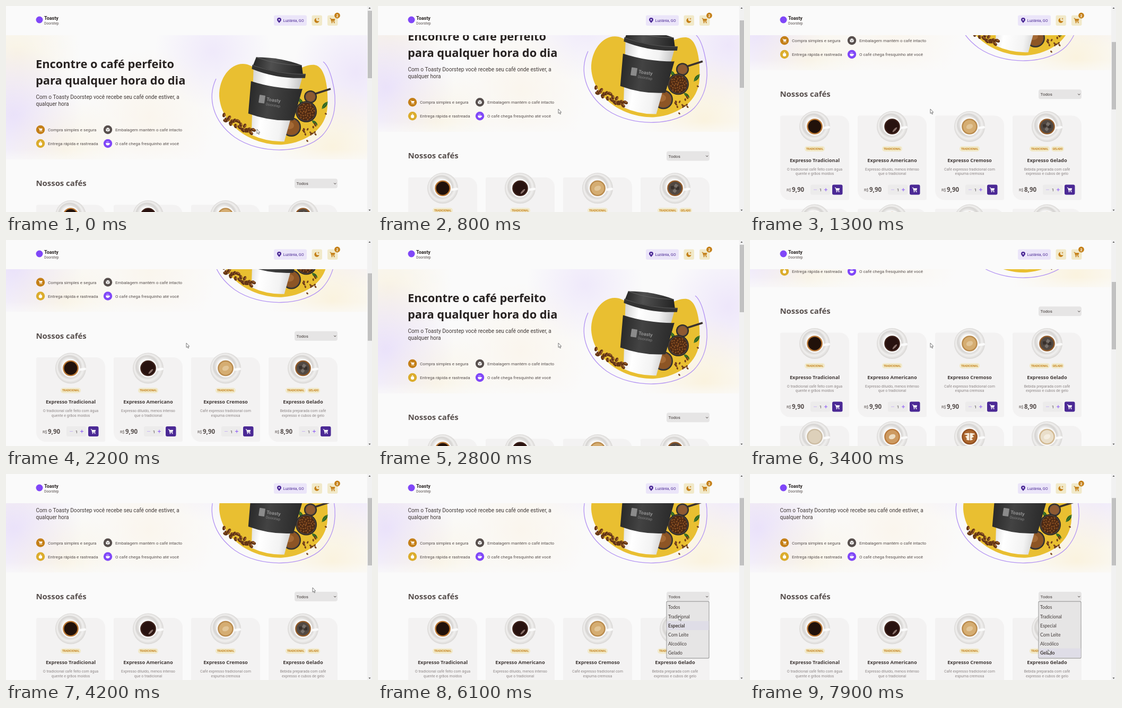
These frames come from a looping animation (690 px wide and 388 px high, 8 s). An HTML page with a canvas:

```html
<!DOCTYPE html>
<html lang="pt-BR">
<head>
<meta charset="utf-8">
<title>Cafeteria</title>
<style>
html, body { margin: 0; width: 100%; height: 100%; overflow: hidden; background: #fafafa; }
canvas { display: block; width: 690px; height: 388px; }
</style>
</head>
<body>
<canvas id="stage" width="690" height="388"></canvas>
<script>
const ctx = document.getElementById('stage').getContext('2d');
const LOOP = 8000, STEP = 100;
const SANS = 'Roboto, sans-serif', ROUND = '"Open Sans", sans-serif', HAND = 'Lato, cursive';
const INK = '#272221', DARK = '#403937', TEXT = '#574f4d', LABEL = '#8d8686';
const PURPLE = '#8047f8', DEEP = '#4b2995', LILAC = '#ebe5f9';
const AMBER = '#c47f17', GOLD = '#dbac2c', CREAM = '#f1e9c9';

// Keyframes: [time, value, ...]
const SCROLL = [[0, 0], [600, 0], [1000, 103.5], [1100, 103.5], [1300, 168], [1500, 207],
  [2000, 207], [2400, 100], [2700, 14], [2800, 0], [2900, 0], [3100, 75], [3300, 175],
  [3400, 200], [3500, 207], [3600, 207], [3900, 125], [4100, 103.5]];
const POINTER = [[0, 473, 232], [600, 340, 194], [3700, 340, 194], [4200, 578, 214],
  [4400, 578, 231], [5100, 578, 231], [5600, 573, 314], [6100, 567, 267], [6500, 565, 318],
  [6900, 562, 267], [7000, 562, 269], [7300, 562, 269], [7700, 562, 331]];
const OPEN_AT = 4700;

function at(keys, t) {
  const i = keys.findIndex(k => k[0] > t);
  if (i < 0) return keys[keys.length - 1].slice(1);
  const a = keys[i - 1], b = keys[i], p = (t - a[0]) / (b[0] - a[0]);
  return a.slice(1).map((v, j) => v + (b[j + 1] - v) * p);
}

function text(s, x, y, size, color, { font = SANS, weight = 400, align = 'left' } = {}) {
  ctx.font = `${weight} ${size}px ${font}`;
  ctx.textAlign = align;
  ctx.fillStyle = color;
  ctx.fillText(s, x, y);
}

function box(x, y, w, h, r, color) {
  ctx.fillStyle = color;
  ctx.beginPath();
  ctx.roundRect(x, y, w, h, r);
  ctx.fill();
}

function disc(x, y, r, color, ry = r, angle = 0) {
  ctx.fillStyle = color;
  ctx.beginPath();
  ctx.ellipse(x, y, r, ry, angle, 0, Math.PI * 2);
  ctx.fill();
}

function shape(d, fill, stroke, width = 1) {
  const p = new Path2D(d);
  if (fill) { ctx.fillStyle = fill; ctx.fill(p); }
  if (stroke) { ctx.strokeStyle = stroke; ctx.lineWidth = width; ctx.stroke(p); }
}

function place(x, y, scale, draw, angle = 0) {
  ctx.save();
  ctx.translate(x, y);
  ctx.rotate(angle);
  ctx.scale(scale, scale);
  draw();
  ctx.restore();
}

function glow(x, y, r, rgb, alpha) {
  const g = ctx.createRadialGradient(x, y, 0, x, y, r);
  g.addColorStop(0, `rgba(${rgb},${alpha})`);
  g.addColorStop(1, `rgba(${rgb},0)`);
  ctx.fillStyle = g;
  ctx.fillRect(0, 55, 681, 234);
}

function cart(x, y, scale, color) {
  place(x, y, scale, () => {
    shape('M-5 -4H-3.2L-1.6 2.2H4', null, color, 1.1);
    shape('M-3 -3H5L3.8 1H-2Z', color);
    disc(-1, 4, 1.1, color);
    disc(3.3, 4, 1.1, color);
  });
}

function random(seed) {
  return () => (seed = seed * 16807 % 2147483647) / 2147483647;
}

function bean(x, y, angle, size) {
  place(x, y, size, () => {
    disc(0, 0, 4.2, '#6b3a18', 2.9);
    disc(-0.4, -0.7, 3, '#a0622e', 1.6);
    shape('M-3.8 0Q0 1.4 3.8 0', null, '#35190a', 0.8);
  }, angle);
}

function bowl(x, y, r, filling) {
  disc(x, y, r, '#2b2523');
  disc(x, y, r - 1.5, '#4d4540');
  disc(x, y, r - 3, filling);
}

function leaf(x, y, angle, size) {
  place(x, y, size, () => {
    shape('M-9 0Q0 -7 9 0Q0 7 -9 0Z', '#2f6322');
    shape('M-9 0H9', null, '#6fa03c', 0.7);
  }, angle);
}

function paperCup() {
  place(514, 118, 1, () => {
    const paper = ctx.createLinearGradient(-48, 0, 48, 0);
    paper.addColorStop(0, '#d2d2d2');
    paper.addColorStop(0.3, '#ffffff');
    paper.addColorStop(0.7, '#f3f3f3');
    paper.addColorStop(1, '#c4c4c4');
    shape('M-47 6L-32 131Q0 140 31 134L47 6Z', paper);
    const sleeve = ctx.createLinearGradient(-48, 0, 48, 0);
    sleeve.addColorStop(0, '#292929');
    sleeve.addColorStop(0.4, '#434343');
    sleeve.addColorStop(1, '#2b2b2b');
    shape('M-48 31Q0 39 50 31L42 92Q0 101 -44 92Z', sleeve);
    const lid = ctx.createLinearGradient(-50, 0, 50, 0);
    lid.addColorStop(0, '#262626');
    lid.addColorStop(0.35, '#505050');
    lid.addColorStop(1, '#202020');
    shape('M-45 -15Q0 -22 42 -13L47 4Q0 12 -49 2Z', lid);
    shape('M-50 0Q0 10 52 2L52 10Q0 20 -50 8Z', '#333');
    shape('M-45 -15Q0 -6 42 -13', null, '#5e5e5e', 1);
    shape('M-50 1Q0 11 52 3', null, '#606060', 0.8);
    box(-28, 54, 11, 15, 1, '#8b8b8b');
    text('Toasty', -14, 63, 9, '#8f8f8f', { weight: 700 });
    text('Doorstep', -14, 72, 6.8, '#858585');
  }, 0.15);
}

function illustration() {
  shape('M402 170C401 135 424 108 447 109C466 109 476 128 510 130C542 130 559 109 582 111' +
    'C603 114 608 158 606 190C604 230 568 257 522 261C470 264 406 229 402 170Z', '#e9bf31');
  shape('M396 137C379 173 390 217 431 247C480 281 562 278 596 244C622 216 625 178 615 140' +
    'C611 124 606 111 598 105', null, '#b393f3', 1.3);
  const rnd = random(41);
  leaf(553, 194, -1.1, 1.2);
  leaf(556, 180, -2.1, 0.9);
  leaf(601, 187, -0.9, 1);
  leaf(582, 220, 0.7, 0.8);
  shape('M584 165L612 156', null, '#3b322e', 3.5);
  bowl(574, 171, 12, '#8e5a32');
  bowl(566, 199, 20, '#4a2814');
  for (let i = 0; i < 36; i++) {
    const a = i * 2.4, r = 2.6 * Math.sqrt(i);
    bean(566 + r * Math.cos(a), 199 + r * Math.sin(a), rnd() * 3, 0.55);
  }
  bowl(538, 228, 18, '#8d5525');
  disc(534, 225, 9, '#a56a35', 7);
  for (let i = 0; i < 14; i++) bean(560 + rnd() * 24, 222 + rnd() * 22, rnd() * 3, 0.55);
  bean(568, 254, 0.8, 0.5);
  bean(603, 203, 0.4, 0.5);
  paperCup();
  for (let i = 0; i < 24; i++) {
    const p = i / 23;
    bean(411 + p * 56, 209 + p * 30 + (rnd() - 0.5) * 13, rnd() * 3, 1);
  }
}

function feature(x, y, color, label, icon) {
  disc(x, y, 8.2, color);
  icon(x, y);
  text(label, x + 14, y + 3, 8.1, TEXT);
}

function hero() {
  glow(20, 90, 120, '248,238,212', 0.55);
  glow(15, 205, 130, '229,218,250', 0.75);
  glow(110, 275, 110, '249,238,208', 0.45);
  glow(390, 85, 110, '232,222,250', 0.6);
  glow(270, 210, 130, '250,240,222', 0.45);
  glow(660, 125, 120, '231,220,250', 0.65);
  glow(615, 265, 120, '250,238,205', 0.6);
  const fade = ctx.createLinearGradient(0, 270, 0, 290);
  fade.addColorStop(0, 'rgba(250,250,250,0)');
  fade.addColorStop(1, 'rgba(250,250,250,.6)');
  ctx.fillStyle = fade;
  ctx.fillRect(0, 270, 681, 20);

  const title = { font: ROUND, weight: 700 };
  text('Encontre o café perfeito', 56, 117, 21.8, INK, title);
  text('para qualquer hora do dia', 56, 148, 21.8, INK, title);
  text('Com o Toasty Doorstep você recebe seu café onde estiver, a', 56.5, 175, 10.15, DARK);
  text('qualquer hora', 56.5, 188, 10.15, DARK);

  feature(65, 233, AMBER, 'Compra simples e segura', (x, y) => cart(x, y, 0.75, '#fff'));
  feature(192, 233, TEXT, 'Embalagem mantém o café intacto', (x, y) => place(x, y, 1, () => {
    shape('M0 -4L3.6 -2V2L0 4L-3.6 2V-2Z', '#fff');
    shape('M-3.6 -2L0 0L3.6 -2M0 0V4', null, TEXT, 0.7);
  }));
  feature(65, 259, GOLD, 'Entrega rápida e rastreada', (x, y) => {
    disc(x, y + 0.7, 3.2, '#fff');
    box(x - 1.2, y - 4.2, 2.4, 1.2, 0, '#fff');
  });
  feature(192, 259, PURPLE, 'O café chega fresquinho até você', (x, y) => place(x, y, 1, () => {
    shape('M-3.8 -1H3.2Q3.2 3.6 -0.3 3.6Q-3.8 3.6 -3.8 -1Z', '#fff');
    shape('M3 -0.2Q5 0 3 1.8M-1.5 -4V-2M0.8 -4V-2', null, '#fff', 0.8);
  }));
  illustration();
}

const DRINKS = [
  { name: 'Expresso Tradicional', lines: ['O tradicional café feito com água', 'quente e grãos moídos'],
    price: '9,90', rim: '#b87532', fill: '#21110a' },
  { name: 'Expresso Americano', lines: ['Expresso diluído, menos intenso', 'que o tradicional'],
    price: '9,90', rim: '#3c2019', fill: '#28120f', shine: true },
  { name: 'Expresso Cremoso', lines: ['Café expresso tradicional com', 'espuma cremosa'],
    price: '9,90', rim: '#b98a4c', fill: '#d5ad72', foam: '#e2c597' },
  { name: 'Expresso Gelado', lines: ['Bebida preparada com café', 'expresso e cubos de gelo'],
    price: '8,90', rim: '#925a28', fill: '#514842', ice: true, tags: ['TRADICIONAL', 'GELADO'] },
  { rim: '#cbbba1', fill: '#ddd0ba' },
  { rim: '#b97a3d', fill: '#cd9a61', foam: '#ecdcc2' },
  { rim: '#8f4d1e', fill: '#ac672f', foam: '#f7efe0', art: true },
  { rim: '#d1b78e', fill: '#eadfcb', foam: '#f5eee1' }
];

function saucer(x, y, d) {
  const g = ctx.createRadialGradient(x - 6, y - 8, 6, x, y, 29);
  g.addColorStop(0, '#ffffff');
  g.addColorStop(0.62, '#d6d4d2');
  g.addColorStop(0.8, '#f1f0ef');
  g.addColorStop(1, '#d9d7d5');
  disc(x, y, 29, g);
  place(x + 22, y + 2, 1, () => box(-7, -2.2, 14, 4.4, 2, '#fbfbfb'), -0.15);
  disc(x, y, 17.5, '#f7f6f5');
  disc(x, y, 14.8, d.rim);
  disc(x, y, 12.4, d.fill);
  if (d.foam) disc(x, y, 6.5, d.foam, 4.5, -0.4);
  if (d.shine) disc(x + 5, y + 6, 6, '#8a716a', 1.8, -0.8);
  if (d.art) {
    for (let i = -1; i < 2; i++) disc(x, y + i * 5, 8 - i * 2, d.foam, 1.9);
    shape(`M${x} ${y - 8}V${y + 9}`, null, d.rim, 1);
  }
  if (d.ice) {
    for (let i = 0; i < 4; i++) {
      place(x + 5 * Math.cos(i * 1.7), y + 5 * Math.sin(i * 1.7), 1,
        () => box(-3, -3, 6, 6, 1, i % 2 ? '#77706b' : '#38302c'), i * 0.7);
    }
  }
}

function tag(label, x, y, w) {
  box(x, y - 5, w, 10, 5, CREAM);
  text(label, x + w / 2, y + 1.8, 5, AMBER, { weight: 700, align: 'center' });
}

function card(d, x, y) {
  const mid = x + 65, center = { align: 'center' };
  box(x, y, 130, 159, [3, 18, 3, 18], '#f3f2f2');
  saucer(mid, y + 20.5, d);
  if (!d.name) return;
  if (d.tags) {
    tag(d.tags[0], mid - 33, y + 62.4, 38);
    tag(d.tags[1], mid + 8, y + 62.4, 24);
  } else {
    tag('TRADICIONAL', mid - 19, y + 62.4, 38);
  }
  text(d.name, mid, y + 87.3, 9.25, DARK, { font: ROUND, weight: 700, align: 'center' });
  d.lines.forEach((s, i) => text(s, mid, y + 103 + i * 8.6, 7.1, LABEL, center));
  text('R$', x + 12, y + 142.5, 7.1, TEXT);
  text(d.price, x + 22, y + 143.5, 11.5, TEXT, { font: ROUND, weight: 700 });
  box(x + 57, y + 130, 37, 19, 3, '#ecebeb');
  shape(`M${x + 63} ${y + 139.5}h6`, null, '#c5b0f2', 0.9);
  shape(`M${x + 83} ${y + 139.5}h6m-3 -3v6`, null, PURPLE, 0.9);
  text('1', x + 76, y + 142.5, 8.1, DARK, center);
  box(x + 98, y + 130, 19.5, 19, 3, DEEP);
  cart(x + 107.5, y + 139.5, 0.95, '#fff');
}

function catalog() {
  text('Nossos cafés', 56.5, 339, 14.9, TEXT, { font: ROUND, weight: 700 });
  box(544, 325.3, 81, 18, 4, '#e6e5e5');
  text('Todos', 547.5, 337.3, 8.1, DARK);
  shape('M618.3 333.4L620.3 335.6L622.3 333.4', null, DARK, 1);
  DRINKS.forEach((d, i) => card(d, 57 + i % 4 * 146, 374.5 + Math.floor(i / 4) * 175.5));
}

function header() {
  box(0, 0, 681, 55, 0, '#fafafa');
  disc(63, 26, 6.5, PURPLE);
  text('Toasty', 72, 25.5, 9, INK, { weight: 700 });
  text('Doorstep', 72, 35, 6.8, TEXT);

  box(505, 17.5, 62, 19.5, 3, LILAC);
  shape('M515 32C512.5 29 511 27.5 511 26A4 4 0 0 1 519 26C519 27.5 517.5 29 515 32Z', DEEP);
  disc(515, 26, 1.4, LILAC);
  text('Luziânia, GO', 522.5, 30, 7.1, DEEP);

  box(576.5, 17.5, 19.5, 19.5, 3, CREAM);
  disc(586, 27.3, 4.6, AMBER);
  disc(588.3, 25, 3.6, CREAM);
  shape('M589 22.6v3m-1.5 -1.5h3', null, AMBER, 0.8);
  box(606, 17.5, 19.5, 19.5, 3, CREAM);
  cart(615.5, 27.3, 1, AMBER);
  disc(624.5, 18, 5.4, AMBER);
  text('2', 624.5, 20.6, 7.1, '#fff', { weight: 700, align: 'center' });
}

function scrollbar(scroll) {
  box(681, 0, 9, 388, 0, '#f1f1f1');
  box(682, 9 + scroll * 0.35, 8, 127, 0, '#c1c1c1');
  shape('M683.5 5L685.5 2.6L687.5 5Z', '#505050');
  shape('M683.5 383.5L685.5 386L687.5 383.5Z', '#505050');
}

function dropdown(active) {
  box(543.5, 239.5, 81, 108, 2, '#8c8c8c');
  box(544.4, 240.4, 79.2, 106.2, 1.5, '#e6e5e5');
  box(544.4, 242.5 + active * 17.2, 79.2, 17.2, 0, '#dfdde7');
  ['Todos', 'Tradicional', 'Especial', 'Com Leite', 'Alcoólico', 'Gelado'].forEach((s, i) =>
    text(s, 547, 254.3 + i * 17.2, 8.7, DARK, { font: HAND, weight: i === active ? 700 : 400 }));
}

function pointer(x, y) {
  place(x, y, 1, () =>
    shape('M0 0V8.4L1.9 6.7L3.2 9.8L4.6 9.2L3.3 6.2H5.7Z', '#fff', '#444', 0.7));
}

function render(t) {
  const [scroll] = at(SCROLL, t);
  box(0, 0, 690, 388, 0, '#fafafa');
  ctx.save();
  ctx.translate(0, -scroll);
  hero();
  catalog();
  ctx.restore();
  header();
  scrollbar(scroll);
  if (t >= OPEN_AT) {
    const hoverY = at(POINTER, t - 150)[1];
    dropdown(Math.max(0, Math.min(5, Math.floor((hoverY - 242.5) / 17.2))));
  }
  pointer(...at(POINTER, t));
}

const start = performance.now();
function tick() {
  const t = (performance.now() - start) % LOOP;
  render(Math.floor(t / STEP) * STEP);
  requestAnimationFrame(tick);
}
tick();
</script>
</body>
</html>
```
